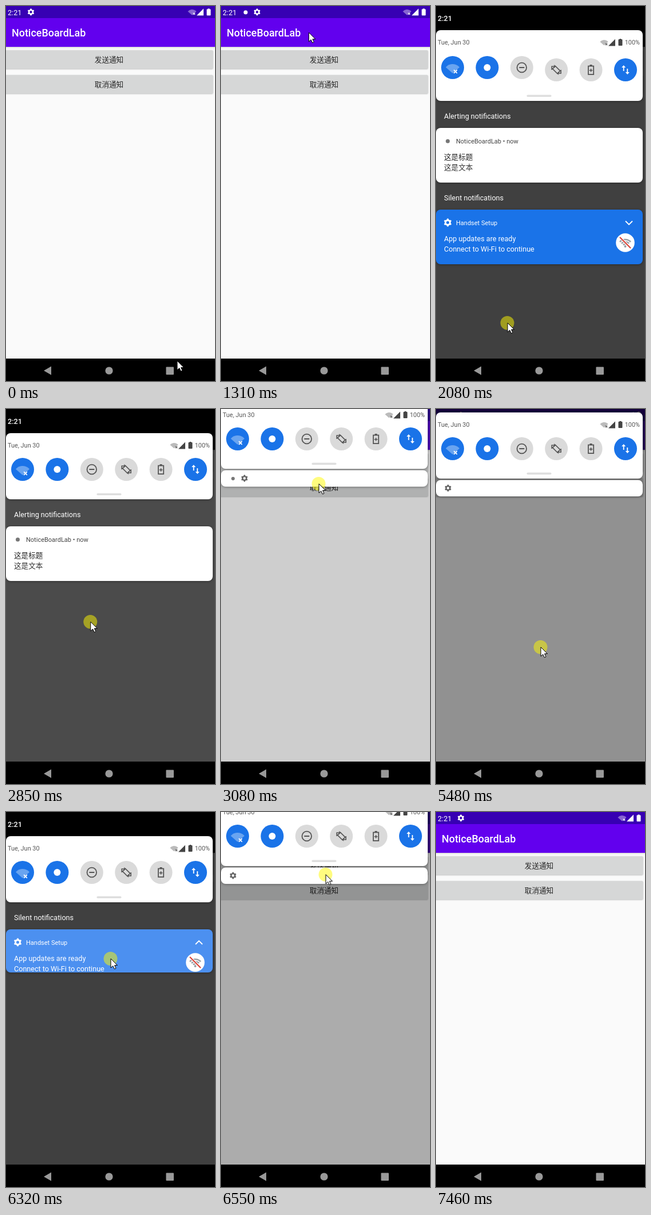
Recreate the animation shown at these times as an HTML page with a canvas. Size 365 by 652 pixels, loop 7860 ms.

```html
<!DOCTYPE html>
<html lang="zh">
<head>
<meta charset="utf-8">
<title>Notification demo</title>
<style>
html, body { margin: 0; width: 100%; height: 100%; overflow: hidden; background: #000; }
canvas { display: block; }
</style>
</head>
<body>
<canvas id="stage" width="365" height="652"></canvas>
<script>
const c = document.getElementById('stage').getContext('2d');
const LOOP = 7860, STEP = LOOP / 102;
const SANS = 'Roboto, "Noto Sans CJK SC", "Noto Sans CJK", sans-serif';
const CJK = '"Noto Sans CJK SC", "Noto Sans CJK", sans-serif';
const APP = 'NoticeBoardLab';
const BLUE = '#1a73e8', INK = '#555';

// All keys are [step, value...], interpolated linearly.
const pointer = [
  [0, 299, 617], [1, 262, 450], [2, 215, 230], [3, 188, 119], [4, 188, 119], [6, 195, 93],
  [13, 195, 93], [15, 180, 128], [18, 140, 5], [20, 140, 5], [27, 125, 551], [29, 125, 575],
  [34, 125, 575], [36, 140, 450], [40, 171, 130], [43, 180, 70], [45, 182, 100], [48, 195, 153],
  [49, 195, 153], [51, 195, 141], [60, 195, 141], [64, 183, 1], [65, 183, 1], [71, 183, 414],
  [75, 183, 600], [78, 183, 600], [82, 183, 255], [86, 183, 60], [89, 183, 50], [92, 258, 245],
  [95, 345, 540], [97, 352, 660]
];
const shade = [
  [20, 0], [22, 70], [24, 135], [25, 220], [26, 380], [27, 441], [34, 441], [36, 400], [38, 250],
  [40, 135], [42, 70], [44, 0], [65, 0], [67, 60], [69, 115], [71, 152], [73, 230], [75, 299],
  [80, 299], [82, 279], [84, 170], [86, 80], [88, 0]
];
const stretch = [[26, 0], [27, 8], [29, 8], [31, 0]];
const presses = [[9, 11], [21, 29], [35, 42], [51, 53], [66, 75], [79, 87]];

const clamp = v => Math.max(0, Math.min(1, v));
const within = (n, a, b) => n >= a && n <= b;

function at(keys, n) {
  if (n <= keys[0][0]) return keys[0].slice(1);
  for (let i = 1; i < keys.length; i++) {
    const a = keys[i - 1], b = keys[i];
    if (n <= b[0]) {
      const k = (n - a[0]) / (b[0] - a[0]);
      return a.slice(1).map((v, j) => v + (b[j + 1] - v) * k);
    }
  }
  return keys[keys.length - 1].slice(1);
}

function rect(x, y, w, h, color) {
  c.fillStyle = color;
  c.fillRect(x, y, w, h);
}
function round(x, y, w, h, r, color) {
  c.beginPath();
  c.roundRect(x, y, w, h, r);
  c.fillStyle = color;
  c.fill();
}
function dot(x, y, r, color) {
  c.beginPath();
  c.arc(x, y, r, 0, Math.PI * 2);
  c.fillStyle = color;
  c.fill();
}
function poly(points, color) {
  c.beginPath();
  points.forEach(p => c.lineTo(p[0], p[1]));
  c.closePath();
  c.fillStyle = color;
  c.fill();
}
function line(points, color, width) {
  c.beginPath();
  points.forEach((p, i) => i ? c.lineTo(p[0], p[1]) : c.moveTo(p[0], p[1]));
  c.strokeStyle = color;
  c.lineWidth = width;
  c.stroke();
}
function text(s, x, y, size, color, weight = 400, align = 'left', family = SANS) {
  c.font = `${weight} ${size}px ${family}`;
  c.textAlign = align;
  c.textBaseline = 'alphabetic';
  c.fillStyle = color;
  c.fillText(s, x, y + size * 0.36);
}
function local(x, y, draw, turn = 0) {
  c.save();
  c.translate(x, y);
  c.rotate(turn);
  draw();
  c.restore();
}

function gear(x, y, r, color) {
  c.beginPath();
  for (let i = 0; i < 24; i++) {
    const a = (i + 0.5) * Math.PI / 12, d = i % 4 < 2 ? r : r * 0.76;
    c.lineTo(x + Math.sin(a - Math.PI / 12) * d, y - Math.cos(a - Math.PI / 12) * d);
  }
  c.closePath();
  c.moveTo(x + r * 0.36, y);
  c.arc(x, y, r * 0.36, 0, Math.PI * 2);
  c.fillStyle = color;
  c.fill('evenodd');
}
function cross(x, y, r, color, w) {
  line([[x - r, y - r], [x + r, y + r]], color, w);
  line([[x + r, y - r], [x - r, y + r]], color, w);
}
function fan(x, y, r, color) {
  c.beginPath();
  c.moveTo(x, y);
  c.arc(x, y, r, -Math.PI * 0.77, -Math.PI * 0.23);
  c.closePath();
  c.fillStyle = color;
  c.fill();
}
function battery(x, y, color) {
  rect(x - 1.5, y - 6, 3, 2, color);
  round(x - 3.5, y - 5, 7, 11, 1, color);
}
function signal(x, y, color) {
  poly([[x + 6, y - 6], [x + 6, y + 6], [x - 6, y + 6]], color);
}

const icons = [
  () => {
    fan(0, 10, 16, 'rgba(255,255,255,.35)');
    cross(5, 7, 2.8, '#fff', 1.8);
  },
  () => dot(0, 0, 6, '#fff'),
  () => {
    c.beginPath();
    c.arc(0, 0, 8.3, 0, Math.PI * 2);
    c.strokeStyle = INK;
    c.lineWidth = 1.8;
    c.stroke();
    rect(-4.5, -1, 9, 2, INK);
  },
  () => {
    local(0, 0, () => {
      c.strokeStyle = INK;
      c.lineWidth = 1.7;
      c.strokeRect(-3.4, -6, 6.8, 12);
    }, -Math.PI / 4);
    for (const turn of [0, Math.PI])
      local(0, 0, () => {
        line([[-8, 0], [-8, -6], [-3, -6]], INK, 1.6);
        poly([[-4, -9], [-1, -6], [-4, -3]], INK);
      }, turn);
  },
  () => {
    rect(-2, -9, 4, 3, INK);
    c.strokeStyle = INK;
    c.lineWidth = 1.8;
    c.strokeRect(-4.6, -6.5, 9.2, 14.5);
    rect(-2.8, 0, 5.6, 1.6, INK);
    rect(-0.8, -2, 1.6, 5.6, INK);
  },
  () => {
    for (const turn of [0, Math.PI])
      local(0, 0, () => {
        rect(-4.2, -5, 1.8, 7, '#fff');
        poly([[-6.8, -4], [-3.3, -8], [0.2, -4]], '#fff');
      }, turn);
  }
];

function button(y, label, start, n, hold) {
  c.save();
  c.shadowColor = 'rgba(0,0,0,.25)';
  c.shadowBlur = 2;
  c.shadowOffsetY = 0.5;
  round(-4, y, 365.5, 32.5, 2, '#d6d7d7');
  c.restore();
  const age = n - start;
  const fade = hold ? (n < 66 ? 1 : 0) : clamp((9 - age) / 4);
  if (age >= 0 && fade > 0) {
    c.save();
    c.beginPath();
    c.roundRect(-4, y, 365.5, 32.5, 2);
    c.clip();
    dot(195, y + 18, 50 + age * 60, `rgba(0,0,0,${0.066 * fade})`);
    c.restore();
  }
  text(label, 180, y + 16.3, 12.6, '#252525', 400, 'center', CJK);
}

function drawApp(n, notified) {
  rect(0, 0, 365, 613, '#fafafa');
  const g = c.createLinearGradient(0, 71, 0, 74);
  g.addColorStop(0, 'rgba(0,0,0,.14)');
  g.addColorStop(1, 'rgba(0,0,0,0)');
  rect(0, 71, 365, 3, g);
  rect(0, 0, 365, 21, '#3700b3');
  rect(0, 21, 365, 50, '#6200ee');
  text('2:21', 3, 11, 12.6, '#fff');
  if (notified) dot(43, 11, 3.5, '#fff');
  gear(notified ? 63 : 43.5, 10.5, 6, '#fff');
  fan(325, 16, 10, 'rgba(255,255,255,.4)');
  cross(328.5, 13.5, 1.7, '#fff', 1.2);
  signal(339, 10.5, '#fff');
  battery(354, 10.5, '#fff');
  text(APP, 10, 47, 17.9, '#fff', 500);
  button(77, '发送通知', 9, n, false);
  button(120, '取消通知', 51, n, true);
}

function surface(y, h, color) {
  c.save();
  c.shadowColor = 'rgba(0,0,0,.35)';
  c.shadowBlur = 4;
  c.shadowOffsetY = 1;
  round(0, y, 361, h, 8, color);
  c.restore();
}
function card(y, bottom, color, draw) {
  const h = Math.min(95, bottom - y);
  if (h < 29) return;
  surface(y, h, color);
  c.save();
  c.beginPath();
  c.roundRect(0, y, 361, h, 8);
  c.clip();
  c.translate(0, y);
  draw();
  c.restore();
}

function alertCard() {
  dot(20.5, 23, 3.5, '#777');
  text(APP + ' • now', 35, 23, 11, '#444');
  text('这是标题', 14, 50.5, 12.6, '#252525', 400, 'left', CJK);
  text('这是文本', 14, 68.5, 12.6, '#333', 400, 'left', CJK);
}
function setupCard(open) {
  gear(20.5, 22.5, 7, '#fff');
  text('Handset Setup', 35, 23, 11, '#fff');
  const d = open ? -3 : 3;
  line([[331, 23 - d], [337, 23 + d], [343, 23 - d]], '#fff', 1.8);
  text('App updates are ready', 14, 50.5, 12.6, '#fff');
  text('Connect to Wi-Fi to continue', 14, 68.5, 12.6, '#fff');
  dot(330.5, 57.5, 16.3, '#fff');
  for (const r of [5, 9, 13]) {
    c.beginPath();
    c.arc(330.5, 65, r, -Math.PI * 0.76, -Math.PI * 0.24);
    c.strokeStyle = '#9aa0a6';
    c.lineWidth = 2.6;
    c.stroke();
  }
  dot(330.5, 64, 2, '#9aa0a6');
  line([[321, 48], [340, 67]], '#fff', 4);
  line([[321, 48], [340, 67]], '#db4437', 2.2);
}

function drawPanel(off, s) {
  const top = 42 + off;
  text('2:21', 3, top - 20.5, 12.6, '#fff', 500);
  surface(top, 115 + s, '#fff');
  const y = top + 21.5;
  text('Tue, Jun 30', 3, y, 10.9, INK);
  fan(293.5, y + 5, 9.5, '#bbb');
  cross(297.5, y + 3, 1.7, INK, 1.2);
  signal(307, y, '#444');
  battery(322, y - 0.5, '#444');
  text('100%', 356, y, 10.9, INK, 400, 'right');
  icons.forEach((draw, i) => {
    const cy = top + 63 + s * (i < 3 ? 0.25 : 0.75);
    local(29 + i * 60.4, cy, () => {
      dot(0, 0, 20, i < 2 || i > 4 ? BLUE : '#dadada');
      draw();
    });
  });
  round(158.5, top + 104.5 + s, 43, 3.5, 1.75, '#dedede');
}

function drawShade(n, reach, notified) {
  const s = at(stretch, n)[0];
  const full = notified ? 441 : 299;
  const dim = 0.74 * clamp((reach / full - 0.16) / 0.61);
  const topDim = Math.min(1, dim * 1.6);
  rect(0, 0, 365, 71, `rgba(0,0,0,${topDim})`);
  rect(0, 71, 365, 542, `rgba(0,0,0,${dim})`);

  const off = Math.min(0, reach - 188);
  const base = 157 + off + s, bottom = reach + s;
  drawPanel(off, s);

  if (reach < 233) {
    surface(bottom - 28.5, 28.5, '#fff');
    if (notified) dot(21, bottom - 14, 3, '#777');
    gear(notified ? 41 : 21, bottom - 14.5, 6, '#666');
  }
  let y = base;
  const section = (label, color, draw) => {
    if (bottom > y + 62) text(label, 14, y + 26, 12.6, '#fff');
    card(y + 47, bottom, color, draw);
    y += 142;
  };
  if (notified) section('Alerting notifications', '#fff', alertCard);
  const lit = !notified && within(n, 81, 84);
  section('Silent notifications', lit ? '#4c90f0' : BLUE, () => setupCard(!notified));
}

function drawNav() {
  rect(0, 613, 365, 39, '#000');
  poly([[66, 634], [79, 626.5], [79, 641.5]], '#999');
  dot(180, 634, 6.6, '#999');
  round(279.5, 627.5, 13.5, 13.5, 1, '#999');
}

function drawPointer(n) {
  const [x, y] = at(pointer, n);
  if (presses.some(p => within(n, p[0], p[1]))) dot(x - 0.5, y, 12, 'rgba(255,250,0,.5)');
  local(x, y, () => {
    poly([[0, 0], [0, 16], [3.8, 12.6], [6.4, 18], [9, 16.9], [6.6, 11.6], [11.5, 11.5]], '#fff');
    c.strokeStyle = '#000';
    c.lineWidth = 1;
    c.stroke();
  });
}

function frame(now) {
  const n = Math.floor(((now % LOOP) + 20) / STEP) % 102;
  const notified = n >= 11 && n < 53;
  const reach = at(shade, n)[0];
  drawApp(n, notified);
  if (reach > 0) drawShade(n, reach, notified);
  drawNav();
  drawPointer(n);
}

const begin = performance.now();
function tick() {
  frame(performance.now() - begin);
  requestAnimationFrame(tick);
}
tick();
</script>
</body>
</html>
```
